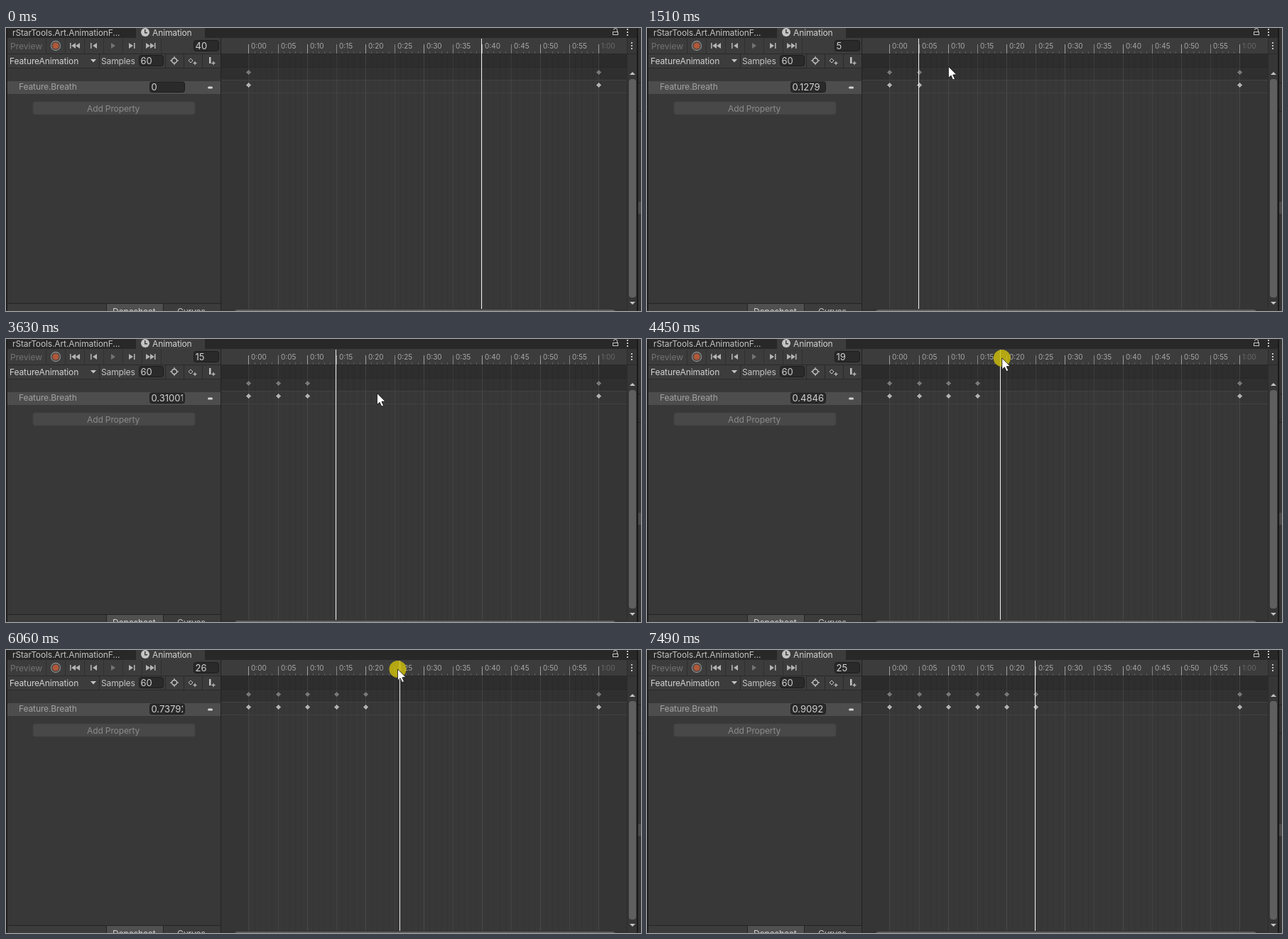
An HTML page with a canvas that plays this animation: 894x399 px, repeating every 7810 ms.

```html
<!DOCTYPE html>
<html lang="en">
<head>
<meta charset="utf-8">
<title>Animation window</title>
<style>
  html, body { margin: 0; width: 100%; height: 100%; overflow: hidden; background: #383838; }
  canvas { display: block; }
</style>
</head>
<body>
<canvas id="stage" width="894" height="399"></canvas>
<script>
const ctx = document.getElementById('stage').getContext('2d');
const LOOP = 7810, RULER_Y = 27, LAST = 60;
const INK = '#c4c4c4', LINE = '#2a2a2a';

// Each take: approach the ruler, scrub to a frame, rest, then key a value there.
const takes = [
  { leave: 50, press: 690, from: 487, release: 1150, frame: 5, settle: 1400, rest: [424.5, 54.5], keyed: 1220, value: 0.1279 },
  { leave: 1510, press: 1960, from: 411, release: 2280, frame: 10, settle: 2660, rest: [520.5, 128.5], keyed: 2850, value: 0.2689 },
  { leave: 2860, press: 3120, from: 459, release: 3290, frame: 15, settle: 3470, rest: [522.5, 76.5], keyed: 3720, value: 0.4484 },
  { leave: 4060, press: 4330, from: 494, release: 4570, frame: 20, settle: 5100, rest: [554.5, 78.5], keyed: 4930, value: 0.69695 },
  { leave: 5250, press: 5720, from: 560, release: 6300, frame: 25, settle: 6450, rest: [547, 28], keyed: 6640, value: 0.90921 }
];
const enter = { t: 50, at: [802, 388] };
const exit = { from: 6550, to: 7270, at: [848, 388], gone: 7480 };

const smooth = u => u * u * (3 - 2 * u);
const easeOut = u => 1 - (1 - u) ** 3;
const headX = frame => 341.5 + frame * 8.2;
const tickX = frame => Math.floor(341.95 + frame * 8.215);

function move(t, t0, t1, a, b, ease) {
  const k = ease(Math.min(1, Math.max(0, (t - t0) / (t1 - t0))));
  return a.map((v, i) => v + (b[i] - v) * k);
}

function pointerAt(t) {
  let at = enter.at;
  for (const { leave, press, from, release, frame, settle, rest } of takes) {
    const start = [from, RULER_Y], end = [headX(frame), RULER_Y];
    if (t < press) return move(t, leave, press, at, start, easeOut);
    if (t < release) return move(t, press, release, start, end, smooth);
    if (t < settle) return move(t, release, settle, end, rest, smooth);
    at = rest;
  }
  return move(t, exit.from, exit.to, at, exit.at, smooth);
}

// Hermite curve through the keys; a tangent is the mean of its neighbouring slopes.
function valueAt(keys, frame) {
  const slopes = keys.slice(1).map((k, i) => (k.value - keys[i].value) / (k.frame - keys[i].frame));
  const tangent = i => ((slopes[i - 1] ?? slopes[i]) + (slopes[i] ?? slopes[i - 1])) / 2;
  const i = Math.max(0, keys.findIndex(k => k.frame >= frame) - 1);
  const a = keys[i], b = keys[i + 1], span = b.frame - a.frame, u = (frame - a.frame) / span;
  return a.value + (b.value - a.value) * smooth(u)
    + span * u * (1 - u) * (tangent(i) * (1 - u) - tangent(i + 1) * u);
}

function stateAt(t) {
  const take = takes.filter(s => s.press <= t).pop();
  const pressed = !!take && t < take.release;
  const keys = [{ frame: 0, value: 0 }, ...takes.filter(s => s.keyed <= t), { frame: LAST, value: 0 }];
  const frame = pressed ? Math.round((pointerAt(t)[0] - headX(0)) / 8.2) : take ? take.frame : 40;
  return { frame, keys, pressed, value: valueAt(keys, frame) };
}

function rect(x, y, w, h, color) {
  ctx.fillStyle = color;
  ctx.fillRect(x, y, w, h);
}

function stroke(color, width = 1) {
  ctx.strokeStyle = color;
  ctx.lineWidth = width;
  ctx.stroke();
}

function round(x, y, w, h, r, fill, edge) {
  ctx.beginPath();
  ctx.roundRect(x, y, w, h, r);
  ctx.fillStyle = fill;
  ctx.fill();
  if (edge) stroke(edge);
}

function text(str, x, y, color = INK, size = 12, spacing = -0.12) {
  ctx.font = `${size}px Inter, sans-serif`;
  ctx.letterSpacing = spacing + 'px';
  ctx.fillStyle = color;
  ctx.fillText(str, x, y);
}

function poly(color, ...pts) {
  ctx.beginPath();
  for (let i = 0; i < pts.length; i += 2) ctx.lineTo(pts[i], pts[i + 1]);
  ctx.closePath();
  ctx.fillStyle = color;
  ctx.fill();
}

function arc(x, y, r, from = 0, to = 7) {
  ctx.beginPath();
  ctx.arc(x, y, r, from, to);
}

function dot(x, y, r, color) {
  arc(x, y, r);
  ctx.fillStyle = color;
  ctx.fill();
}

function diamond(x, y, r, color, edge) {
  poly(color, x, y - r, x + r, y, x, y + r, x - r, y);
  if (edge) stroke(edge);
}

function plus(x, y, r, color) {
  rect(x - r, y - .6, 2 * r, 1.2, color);
  rect(x - .6, y - r, 1.2, 2 * r, color);
}

function kebab(x, y) {
  for (let i = 0; i < 3; i++) rect(x, y + 4 * i, 2, 2, INK);
}

function field(x, y, w, h, str) {
  round(x + .5, y + .5, w - 1, h - 1, 3, LINE, '#1c1c1c');
  ctx.save();
  ctx.beginPath();
  ctx.rect(x + 2, y, w - 5, h);
  ctx.clip();
  text(str, x + 2.5, y + 12.5, '#d2d2d2', 13, 0);
  ctx.restore();
}

function arrow(x, dir, color = '#b4b4b4') {
  poly(color, x - 3 * dir, 21, x + 3 * dir, 25, x - 3 * dir, 29);
}

function drawTabs() {
  rect(0, 0, 894, 14, '#282828');
  text('rStarTools.Art.AnimationF...', 9, 11);
  rect(183, 0, 97, 14, '#3c3c3c');
  dot(196, 6, 6, INK);
  rect(195, 2, 1.5, 5, '#3c3c3c');
  rect(195, 6, 4, 1.5, '#3c3c3c');
  text('Animation', 206, 11, '#d2d2d2');
  rect(854, 5, 8, 5, INK);
  rect(855, 6, 6, 3, '#282828');
  arc(858, 3, 2.5, Math.PI, 0);
  ctx.lineTo(860.5, 5);
  stroke(INK);
  kebab(874, 1);
}

function drawToolbar() {
  rect(0, 14, 303, 43, '#3c3c3c');
  rect(0, 36, 303, 1, LINE);
  rect(0, 56, 303, 1, LINE);
  for (let x = 56; x < 220; x += 27) rect(x, 15, 1, 21, '#303030');
  for (let x = 224; x < 280; x += 26) rect(x, 37, 1, 19, LINE);
  rect(131, 37, 1, 19, LINE);

  text('Preview', 6, 30, '#747474', 12, 0);
  arc(70, 25, 6.5);
  stroke('#8c8c8c', 1.3);
  dot(70, 25, 4.6, '#b0583a');
  for (const x of [90, 119, 180, 209]) rect(x, 21, 1.5, 8, '#b4b4b4');
  for (const x of [95, 101, 125]) arrow(x, -1);
  for (const x of [176, 200, 206]) arrow(x, 1);
  arrow(151, 1, '#747474');

  text('FeatureAnimation', 5, 51, '#d2d2d2');
  poly(INK, 119, 44, 127, 44, 123, 48.5);
  text('Samples', 134, 51);
  field(187, 38, 35, 16, '60');
  plus(237, 46, 6, INK);
  dot(237, 46, 3.5, '#3c3c3c');
  arc(237, 46, 3.5);
  stroke(INK, 1.4);
  diamond(260, 46, 3, '#3c3c3c', INK);
  rect(286, 41, 2.5, 9, INK);
  plus(266, 49.5, 2.5, INK);
  plus(292, 49.5, 2.5, INK);
}

function drawPanel() {
  rect(0, 57, 303, 342, '#383838');
  rect(2, 75, 300, 18, '#4d4d4d');
  text('Feature.Breath', 18, 87, '#a2a2a2');
  round(284, 82.5, 7, 3, 1.5, '#d2d2d2');
  round(38, 104, 228, 18, 3, '#484848', '#404040');
  text('Add Property', 114, 118, '#8c8c8c');
  rect(0, 388, 303, 1, '#242424');
  rect(0, 389, 303, 10, '#3c3c3c');
  rect(141, 389, 81, 10, '#242424');
  rect(142, 389, 79, 10, '#505050');
  text('Dopesheet', 150, 404, '#d2d2d2');
  text('Curves', 241, 404);
}

function drawSheet() {
  rect(303, 14, 572, 22, '#3c3c3c');
  rect(303, 36, 572, 19, '#2e2e2e');
  rect(303, 55, 572, 18, '#323232');
  rect(303, 73, 572, 326, '#383838');
  rect(303, 36, 572, 1, '#292929');
  rect(303, 55, 572, 1, '#292929');
  for (let f = 0; f <= LAST; f++) {
    const x = tickX(f);
    if (f % 5) {
      rect(x, 37, 1, 359, 'rgba(0,0,0,.07)');
      rect(x, 33, 1, 3, '#5c5c5c');
      continue;
    }
    rect(x, 37, 1, 359, `rgba(255,255,255,${f % 10 ? .055 : .085})`);
    rect(x, 23, 1, 13, f % 10 ? '#858585' : '#a0a0a0');
    const label = `${Math.floor(f / 60)}:${String(f % 60).padStart(2, '0')}`;
    text(label, x + 4, 29, f < LAST ? '#a8a8a8' : '#686868', 10, 0);
  }
  rect(303, 37, 39, 359, 'rgba(0,0,0,.06)');
  rect(835, 37, 40, 359, 'rgba(0,0,0,.06)');
  rect(303, 73, 572, 1, '#424242');
  rect(303, 91, 572, 1, '#424242');
  rect(302, 14, 1, 385, '#222');
}

function drawEdges() {
  rect(0, 0, 2, 399, '#1e1e1e');
  rect(875, 14, 13, 385, '#363636');
  rect(874, 14, 1, 385, '#2c2c2c');
  rect(875, 36, 13, 1, LINE);
  kebab(880, 20);
  poly(INK, 878, 66, 886, 66, 882, 62);
  poly(INK, 878, 386, 886, 386, 882, 390);
  round(877, 72, 10, 308, 4, '#5f5f5f');
  rect(303, 396, 572, 3, '#333');
  round(322, 397, 536, 8, 4, '#5f5f5f');
  rect(888, 0, 2, 399, '#1a1a1a');
  rect(890, 0, 4, 399, '#343434');
  rect(890, 77, 4, 1, '#222');
  rect(890, 117, 4, 1, '#222');
  rect(890, 245, 4, 17, '#4a4a4a');
}

function drawPointer([x, y], pressed) {
  if (pressed) dot(x, y, 12, 'rgba(205,190,10,.82)');
  ctx.save();
  ctx.translate(x, y);
  poly('#fff', 0, 0, 0, 16, 3.6, 12.7, 6.2, 18.6, 9, 17.4, 6.4, 11.7, 11.4, 11.4);
  stroke('#111', .8);
  ctx.restore();
}

function draw(t) {
  const { frame, value, keys, pressed } = stateAt(t);
  drawTabs();
  drawToolbar();
  drawPanel();
  drawSheet();
  field(264, 17, 36, 16, String(frame));
  field(202, 75.5, 50, 15.5, String(+value.toFixed(5)));
  for (const key of keys) {
    const x = tickX(key.frame) + .6;
    diamond(x, 62.5, 4.2, '#777', '#262626');
    diamond(x, 80.5, 4.2, '#b0b0b0', '#262626');
  }
  rect(Math.floor(headX(frame)), 15, 1, 381, '#f0f0f0');
  drawEdges();
  if (t >= enter.t && t < exit.gone) drawPointer(pointerAt(t), pressed);
}

function tick() {
  draw(performance.now() % LOOP);
  requestAnimationFrame(tick);
}
tick();
</script>
</body>
</html>
```
